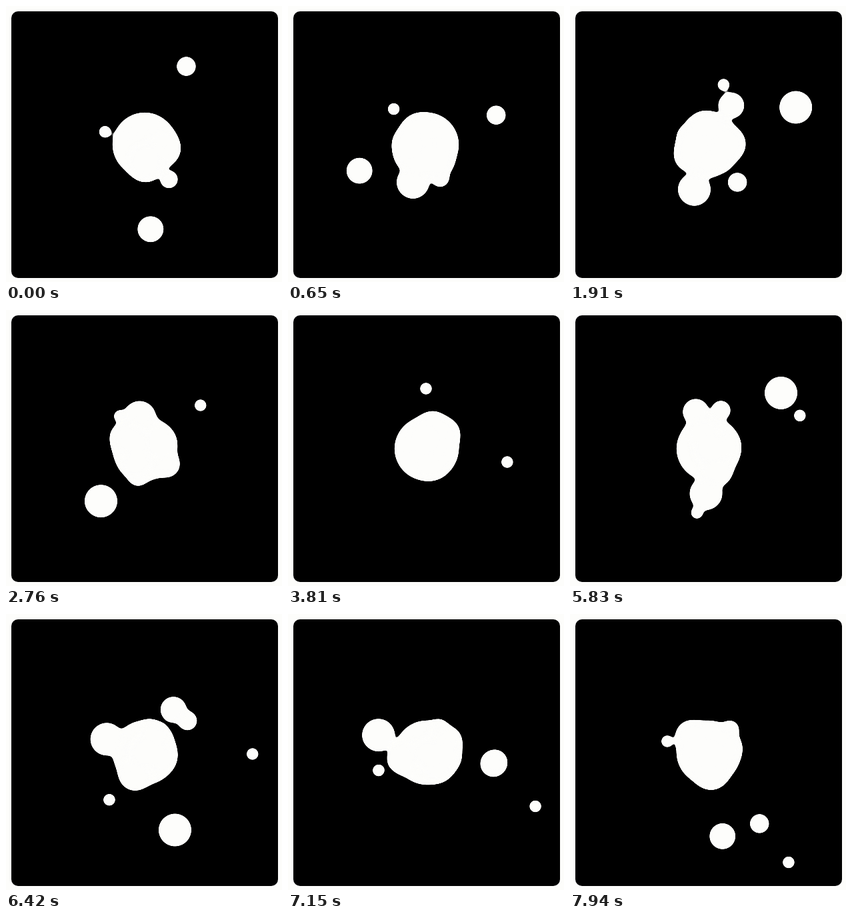
These frames come from a looping animation (414 px wide and 414 px high, 7990 ms). An HTML page:

```html
<!DOCTYPE html>
<html lang="en">
<head>
<meta charset="utf-8">
<title>Gooey orbits</title>
<style>
  html, body { margin: 0; width: 100%; height: 100%; overflow: hidden; background: #fdfdfb; }
  svg { display: block; width: 100%; height: 100%; }
</style>
</head>
<body>
<svg viewBox="0 0 414 414">
  <defs>
    <filter id="soft" x="-1.5" y="-1.5" width="4" height="4">
      <feGaussianBlur stdDeviation="5"/>
    </filter>
    <filter id="sharp" filterUnits="userSpaceOnUse" x="0" y="0" width="414" height="414">
      <feComponentTransfer><feFuncA type="linear" slope="20" intercept="-9.5"/></feComponentTransfer>
    </filter>
  </defs>
  <rect x="8" y="8" width="400" height="400" rx="10"/>
  <g id="blobs" filter="url(#sharp)" fill="#fdfdfb"></g>
</svg>
<script>
const LOOP = 7990, CENTER = 208, DELAY = 0.03;
const group = document.getElementById('blobs');
const bodies = [];

function circle(r) {
  const dot = document.createElementNS('http://www.w3.org/2000/svg', 'circle');
  dot.setAttribute('r', r);
  dot.setAttribute('filter', 'url(#soft)');
  group.append(dot);
  return dot;
}

function place(dot, angle, dist) {
  const a = angle * Math.PI / 180;
  dot.setAttribute('cx', CENTER + dist * Math.cos(a));
  dot.setAttribute('cy', CENTER + dist * Math.sin(a));
}

// Distance falls evenly from `far` at the peak time to 0 at `reach` seconds away
const pulse = (far, peak, reach, cycle = 16) => t => {
  const gap = ((t - DELAY - peak) % cycle + cycle) % cycle;
  return Math.max(0, far * (1 - Math.min(gap, cycle - gap) / reach));
};
const sink = far => pulse(far, 0, 4);
const rise = far => pulse(far, 8, 4);
const sinkAndRise = far => pulse(far, 0, 4, 8);

// Start in degrees, speed in degrees per second
function orbit(size, start, speed, dist) {
  const dot = circle(size);
  bodies.push(t => place(dot, start + speed * t, dist(t)));
}

place(circle(48.5), 0, 0);

// Free droplets
orbit(10, 198, 45, pulse(126, 4, 8));
orbit(10, 136, 35, pulse(206, 8, 7.5));
orbit(15, -62, 60, sinkAndRise(134));
orbit(20, 86, 112, sink(128));
orbit(20, 86, 90, rise(130));
orbit(25, -7, 180, pulse(150, 2, 2.3, 4));
orbit(25, 124, 180, pulse(75, 2, 2, 4));

// Slow bumps on the rim
orbit(14, 55, 20, sink(64));
orbit(14, 154, 20, pulse(48, 8, 6));

// Bodies that stay inside and swell the core
orbit(25, 12, 72, pulse(36, 7, 40));
orbit(25, 87, 90, pulse(30, 0, 12, 8));
orbit(25, 87, 45, pulse(28, 0, 8, 8));
orbit(25, 87, 142, pulse(34, 1.5, 4));

function draw(ms) {
  const t = ms % LOOP / 1000;
  bodies.forEach(move => move(t));
}

let begin;
function tick(now) {
  begin ??= now;
  draw(now - begin);
  requestAnimationFrame(tick);
}
draw(0);
requestAnimationFrame(tick);
</script>
</body>
</html>
```
